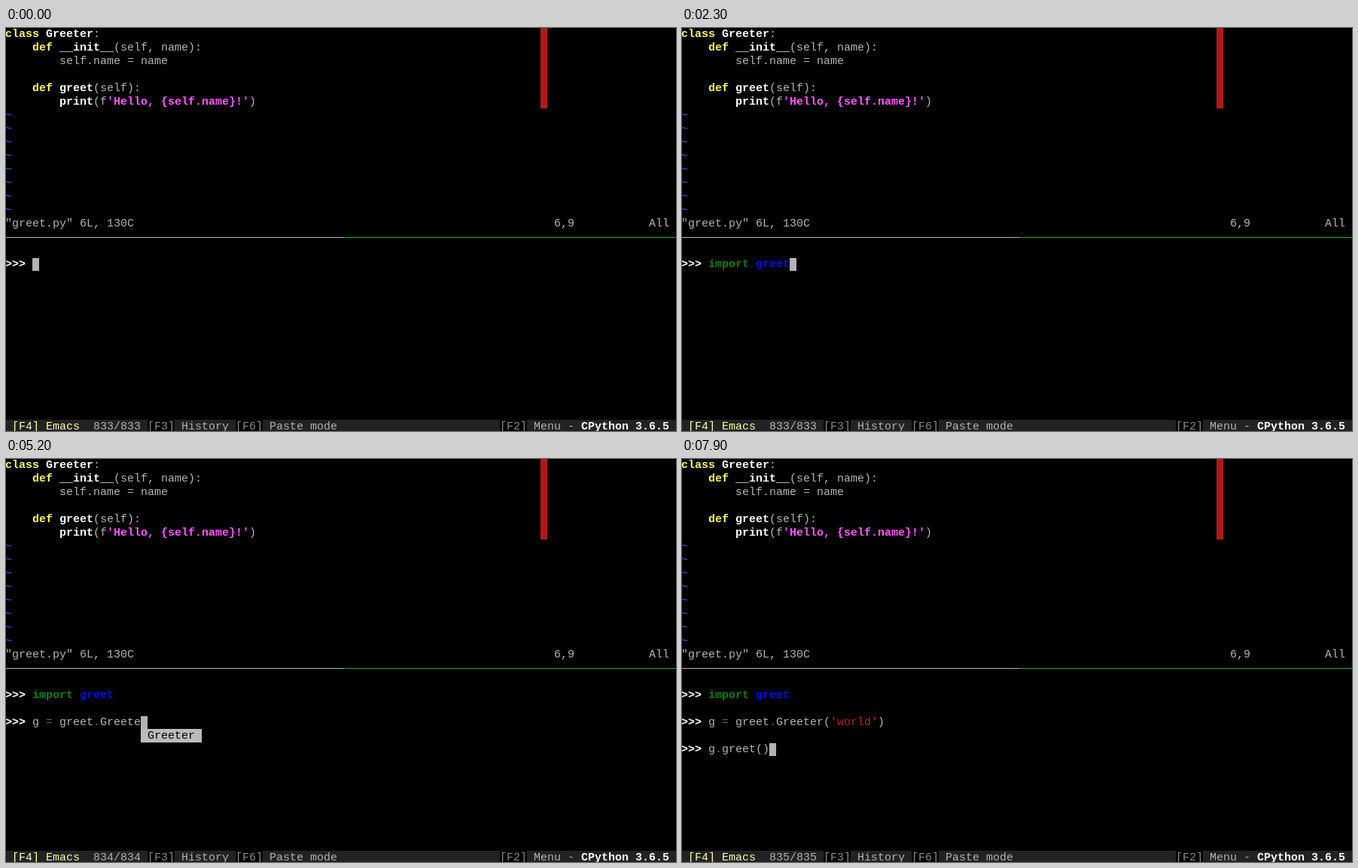
An HTML page for the animation above (8000 ms loop, 890 by 536 pixels).

```html
<!DOCTYPE html>
<html lang="en">
<head>
<meta charset="utf-8">
<title>Python prompt</title>
<style>
html, body { margin: 0; width: 100%; height: 100%; overflow: hidden; background: #000; }
#screen {
  position: relative; width: 890px; height: 536px; overflow: hidden;
  font: 15px/20px "Liberation Mono", "DejaVu Sans Mono", monospace;
  color: #b2b2b2;
}
#screen span { position: absolute; white-space: pre; height: 18px; }
#screen .box { background: #bbb; }
#screen .cursor { background: #b2b2b2; height: 17px; margin-top: 1px; }
#screen .margin { background: #b21818; height: 108px; }
#screen .bar { background: #222; }
#screen .gap { background: #000; color: #888; }
#screen .rule { height: 1px; }
.key { color: #ffff54; font-weight: bold; }
.name { color: #fff; font-weight: bold; }
.text { color: #ff54ff; font-weight: bold; }
.tilde { color: #5454ff; }
.mode { color: #ffa; }
.item { color: #000; }
.kw { color: #008000; font-weight: bold; }
.mod { color: #00f; font-weight: bold; }
.op { color: #666; }
.str { color: #ba2121; }
</style>
</head>
<body>
<div id="screen"><div id="editor"></div><div id="repl"></div></div>
<script>
const CW = 9, RH = 18, LOOP = 8000, TICK = 100;
const editor = document.getElementById('editor');
const repl = document.getElementById('repl');

function put(parent, row, col, text, cls = '', cells = 0) {
  const el = document.createElement('span');
  el.className = cls;
  el.textContent = text;
  el.style.left = col * CW - 1 + 'px';
  el.style.top = row * RH - 1 + 'px';
  if (cells) el.style.width = cells * CW + 'px';
  parent.append(el);
  return el;
}

// Each part is [class, text]; parts follow one another on the row.
function putRow(parent, row, col, parts) {
  for (const [cls, text] of parts) {
    put(parent, row, col, text, cls);
    col += text.length;
  }
}

function rule(x, width, color) {
  const el = put(editor, 0, 0, '', 'rule');
  Object.assign(el.style, { left: x + 'px', top: '278px', width: width + 'px', background: color });
}

function drawEditor() {
  putRow(editor, 0, 0, [['key', 'class '], ['name', 'Greeter'], ['', ':']]);
  putRow(editor, 1, 4, [['key', 'def '], ['name', '__init__'], ['', '(self, name):']]);
  putRow(editor, 2, 8, [['', 'self.name = name']]);
  putRow(editor, 4, 4, [['key', 'def '], ['name', 'greet'], ['', '(self):']]);
  putRow(editor, 5, 8, [['name', 'print'], ['', '(f'], ['text', "'Hello, {self.name}!'"], ['', ')']]);
  for (let row = 6; row < 14; row++) put(editor, row, 0, '~', 'tilde');
  put(editor, 0, 79, '', 'margin', 1);
  put(editor, 14, 0, '"greet.py" 6L, 130C');
  put(editor, 14, 81, '6,9');
  put(editor, 14, 95, 'All');
  rule(0, 449, '#b2b2b2');
  rule(449, 441, '#18b218');
}

const words = s => s.split(' ');
const builtins = words('GeneratorExit getattr global globals greet id if import ImportError ' +
  'ImportWarning IndentationError IndexError input int InterruptedError IOError ' +
  'IsADirectoryError isinstance issubclass iter');
const modules = words('gc gdbus_codegen gemato genericpath gentoolkit getopt getpass gettext ' +
  'gevent gi glob google greenlet greet gridfs grp gzip');
const dunder = s => words(s).map(w => `__${w}__`);
const moduleAttrs = ['Greeter', ...dunder('builtins cached doc file loader name package spec')];
const objectAttrs = ['greet', 'name', ...dunder('class delattr dict dir doc eq format ge ' +
  'getattribute gt hash init init_subclass le lt module ne new reduce reduce_ex repr ' +
  'setattr sizeof str subclasshook weakref')];

// Times are in ticks: when the prompt appears, then one per typed character.
const lines = [
  { start: 0, text: 'import greet',
    keys: [10, 11, 12, 13, 14, 15, 16, 17, 19, 20, 21, 22] },
  { start: 27, text: "g = greet.Greeter('world')",
    keys: [29, 31, 32, 33, 38, 40, 41, 42, 43, 44, 45, 46, 48, 50, 51, 52, 53, 54,
      56, 58, 59, 60, 61, 62, 62, 65] },
  { start: 67, text: 'g.greet()',
    keys: [69, 70, 71, 72, 74, 76, 77, 78, 79] }
];
const slow = { text: 'import g', until: 18 }; // the module list takes a moment

function complete(text, index, tick) {
  if (!/[\w.]$/.test(text) || text.includes("'")) return [];
  if (text === slow.text && tick < slow.until) return [];
  const word = text.match(/\w*$/)[0];
  const before = text.slice(0, text.length - word.length);
  let pool = index === 2 ? ['g', ...builtins] : builtins;
  if (before === 'import ') pool = modules;
  else if (before.endsWith('greet.')) pool = moduleAttrs;
  else if (before === 'g.') pool = objectAttrs;
  const found = pool.filter(w => w.toLowerCase().startsWith(word.toLowerCase()));
  return found.length === 1 && found[0] === word ? [] : found;
}

function drawMenu(row, col, items) {
  if (!items.length) return;
  const width = Math.max(...items.map(w => w.length)) + 1;
  const cols = Math.min(Math.ceil(items.length / 3), Math.floor(96 / width));
  const rows = Math.ceil(items.length / cols);
  put(repl, row, col, '', 'box', cols * width + 1).style.height = rows * RH + 'px';
  items.forEach((item, i) =>
    put(repl, row + i % rows, col + 1 + Math.floor(i / rows) * width, item, 'item'));
}

function tokenClass(token, at, text) {
  if (token === 'import') return 'kw';
  if (at === 7 && text.startsWith('import ')) return 'mod';
  if (token[0] === "'") return 'str';
  return /[.=]/.test(token) ? 'op' : '';
}

function drawStatus(count) {
  const row = 29;
  put(repl, row, 0, '', 'bar', 100);
  put(repl, row, 1, '[F4] Emacs', 'mode');
  put(repl, row, 13, `${count}/${count}`);
  put(repl, row, 21, '[F3]', 'gap', 4);
  put(repl, row, 26, 'History');
  put(repl, row, 34, '[F6]', 'gap', 4);
  put(repl, row, 39, 'Paste mode');
  put(repl, row, 73, '[F2]', 'gap', 4);
  put(repl, row, 78, 'Menu -');
  put(repl, row, 85, 'CPython 3.6.5', 'name');
}

function drawRepl(tick) {
  repl.replaceChildren();
  const shown = lines.filter(l => l.start <= tick);
  const last = shown.length - 1;
  shown.forEach((line, i) => {
    const row = 17 + 2 * i;
    const text = line.text.slice(0, line.keys.filter(k => k <= tick).length);
    put(repl, row, 0, '>>>', 'name');
    for (const m of text.matchAll(/'\w*'?|\w+|\W/g))
      put(repl, row, 4 + m.index, m[0], tokenClass(m[0], m.index, text));
    if (i === last) {
      const col = 4 + text.length;
      put(repl, row, col, '', 'cursor', 1);
      drawMenu(row + 1, col, complete(text, i, tick));
    }
  });
  drawStatus(833 + last);
}

let drawn = -1;
function frame() {
  const tick = Math.floor(performance.now() % LOOP / TICK);
  if (tick !== drawn) drawRepl(drawn = tick);
  requestAnimationFrame(frame);
}

drawEditor();
frame();
</script>
</body>
</html>
```
